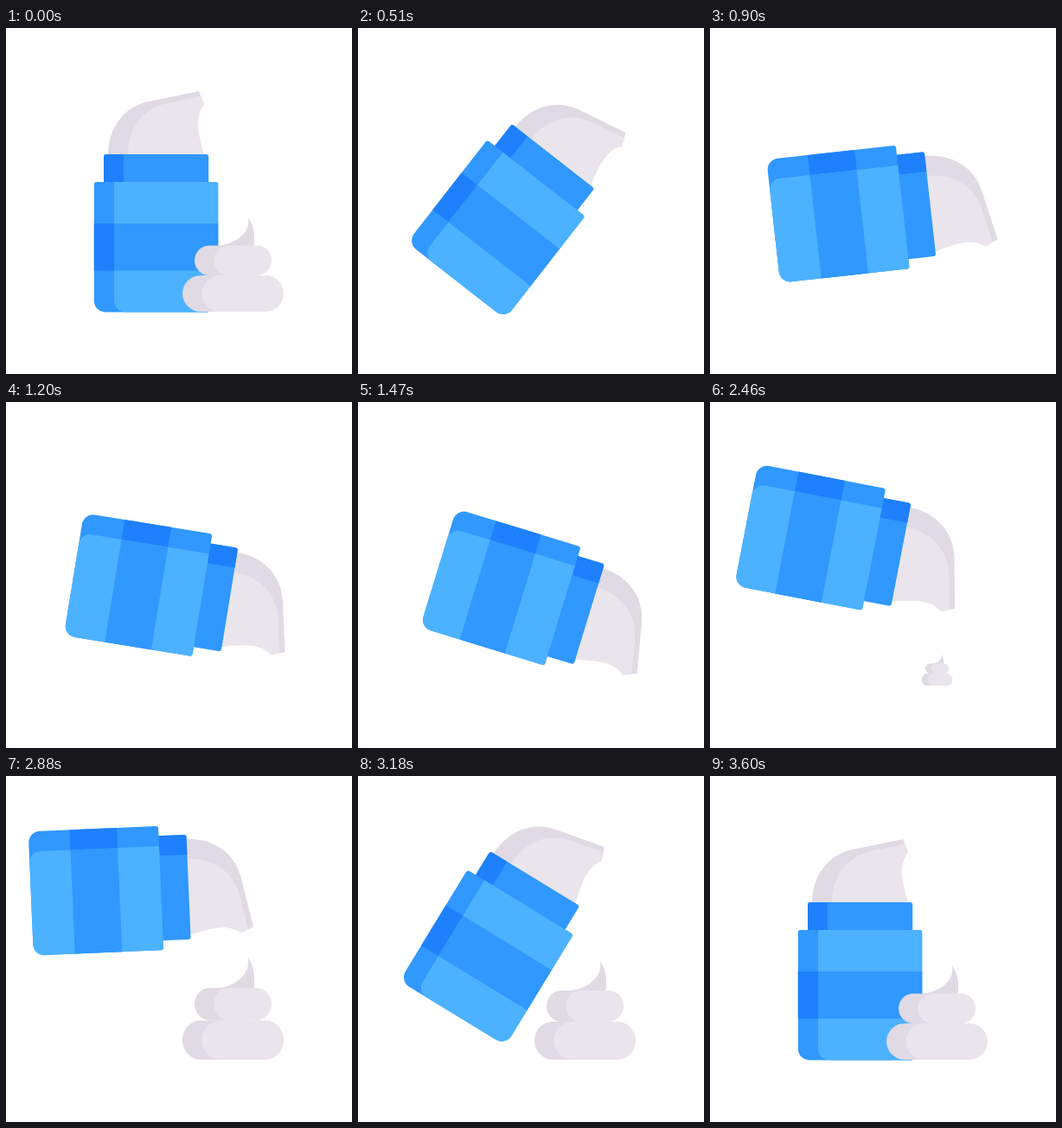
An HTML page with a canvas that plays this animation: 400 by 400 pixels, repeating every 5.63 s.

```html
<!DOCTYPE html>
<html lang="en">
<head>
<meta charset="utf-8">
<title>Cream bottle</title>
<style>
html, body { margin: 0; width: 100%; height: 100%; overflow: hidden; background: #fff; }
canvas { display: block; width: 100%; height: 100%; }
</style>
</head>
<body>
<canvas id="stage" width="400" height="400"></canvas>
<script>
const ctx = document.getElementById('stage').getContext('2d');
const LOOP = 5630, STEP = 30, END = 3600;
const POUR = 2040, RETURN = 2770;
const LIGHT = '#4cb2ff', MID = '#3098ff', DEEP = '#1e80fc';
const CREAM = '#eae5ec', SHADE = '#e0dae4';
const PIVOT = { x: 173.5, y: 253 };
const BASE = { x: 262.5, y: 328 };

// Progress from 0 to 1 along cubic-bezier(x1, 0, x2, 1)
function ease(t, from, to, x1 = 1 / 3, x2 = 2 / 3) {
  const x = Math.min(1, Math.max(0, (t - from) / (to - from)));
  let lo = 0, hi = 1;
  for (let i = 0; i < 24; i++) {
    const s = (lo + hi) / 2, r = 1 - s;
    if (3 * r * r * s * x1 + 3 * r * s * s * x2 + s * s * s < x) lo = s;
    else hi = s;
  }
  return lo * lo * (3 - 2 * lo);
}

// Push along the bottle's own axis: one slow stroke, then four quick ones
function shake(t) {
  if (t >= POUR) return 0;
  const slow = 510, quick = (POUR - slow) / 4;
  const phase = t < slow ? t / slow : (t - slow) / quick;
  return (35 - 0.008 * t) * (1 - Math.cos(2 * Math.PI * phase)) / 2;
}

function bottlePose(t) {
  const tilt = ease(t, 0, 2180, 0.341, 0.098);
  const move = ease(t, 0, 2180, 0.35, 0);
  const lift = ease(t, POUR, RETURN);
  const away = 1 - ease(t, RETURN, END, 1 / 3, 0.4);
  return {
    x: PIVOT.x - away * (32.3 * move + 41.4 * lift),
    y: PIVOT.y - away * (48 * move + 79.7 * lift),
    angle: away * (113.5 * tilt - 20.5 * lift) * Math.PI / 180
  };
}

function box(color, x1, y1, x2, y2, radii = 0) {
  ctx.fillStyle = color;
  ctx.beginPath();
  ctx.roundRect(x1, y1, x2 - x1, y2 - y1, radii);
  ctx.fill();
}

function shape(color, d) {
  ctx.fillStyle = color;
  ctx.fill(new Path2D(d));
}

function drawBottle(t) {
  const pose = bottlePose(t);
  ctx.save();
  ctx.translate(pose.x, pose.y);
  ctx.rotate(pose.angle);
  ctx.translate(-PIVOT.x, -PIVOT.y - shake(t));

  const edge = 'L229 88C219 101 220 117 229 147';
  shape(SHADE, 'M118 147C118 116 136 91 165 85L223 73' + edge + 'Z');
  shape(CREAM, 'M141 147C141 117 157 93.5 186 87L225.5 79' + edge + 'Z');

  box(MID, 113, 146, 234.2, 180, [3, 3, 0, 0]);
  box(DEEP, 113, 146, 136, 180, [3, 0, 0, 0]);

  box(MID, 101.8, 178, 245.2, 328.4, [3, 3, 13, 13]);
  box(LIGHT, 125, 178, 245.2, 328.4, [0, 3, 13, 13]);
  box(DEEP, 101.8, 226, 125, 280.5);
  box(MID, 125, 226, 245.2, 280.5);
  ctx.restore();
}

function drawCream(t) {
  const grow = ease(t, POUR + 240, RETURN);
  const width = 1 - ease(t, 0, 300) + grow;
  const stretch = 0.09 * (grow - ease(t, RETURN, END));
  if (width < 0.001) return;

  ctx.save();
  ctx.translate(BASE.x, BASE.y);
  ctx.scale(width, width + stretch);
  ctx.translate(-BASE.x, -BASE.y);
  shape(SHADE, 'M280 219C287 229 288 240 286.5 252L244 252C264 250 283 238 280 219Z');
  box(SHADE, 218, 251.5, 290, 286, 17.2);
  box(CREAM, 240.5, 251.5, 307, 286, 17.2);
  box(SHADE, 204, 286, 300, 328, 21);
  box(CREAM, 226.5, 286, 321, 328, 21);
  ctx.restore();
}

function draw(t) {
  ctx.fillStyle = '#fff';
  ctx.fillRect(0, 0, 400, 400);
  drawBottle(t);
  drawCream(t);
}

const start = performance.now();
function tick() {
  const t = (performance.now() - start) % LOOP;
  draw(Math.min(END, Math.floor(t / STEP) * STEP));
  requestAnimationFrame(tick);
}
tick();
</script>
</body>
</html>
```
